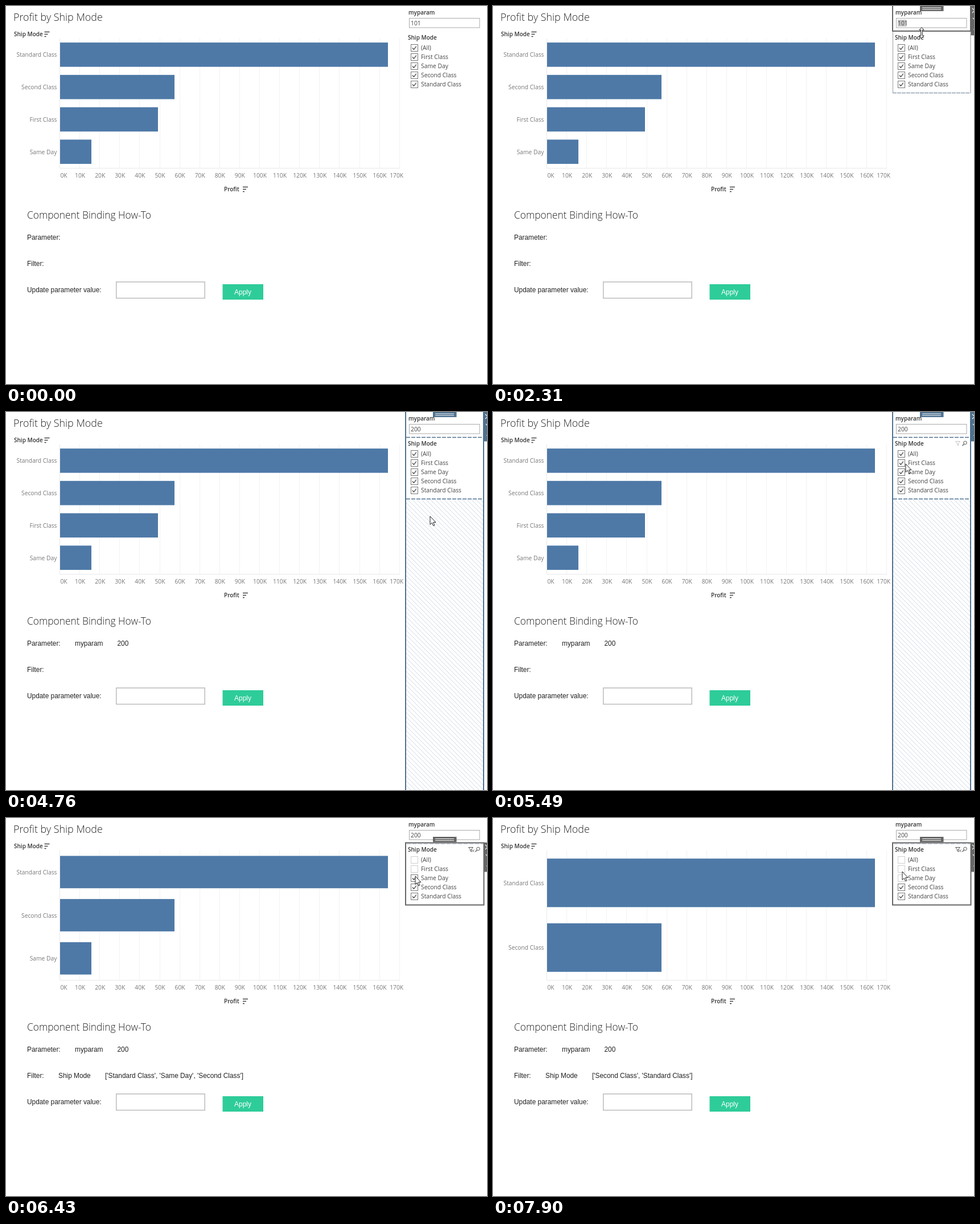
These frames come from a looping animation (845 px wide and 663 px high, 8 s). An HTML page:

```html
<!DOCTYPE html>
<html lang="en">
<head>
<meta charset="utf-8">
<title>Profit by Ship Mode</title>
<style>
  html, body { margin: 0; width: 100%; height: 100%; overflow: hidden; background: #fff; }
  svg { display: block; width: 845px; height: 663px; }
  text { font: 10.3px "Open Sans", "Noto Sans", sans-serif; fill: #444; white-space: pre; }
  .title { font-size: 17.9px; font-weight: 300; fill: #222; }
  .sub { font-size: 17.35px; }
  .bold { font-size: 10px; font-weight: 600; fill: #333; }
  .axis { fill: #787878; }
  .form { font: 11.86px "Liberation Sans", Arial, sans-serif; fill: #222; }
  .button { font-size: 12px; fill: #fff; }
</style>
</head>
<body>
<svg viewBox="0 0 845 663" xmlns="http://www.w3.org/2000/svg">
  <defs>
    <clipPath id="pane"><rect x="95" y="57" width="600" height="227"/></clipPath>
    <pattern id="hatch" width="8" height="8" patternUnits="userSpaceOnUse">
      <path d="M-2-2L10 10M-2 6L2 10M6-2L10 2" stroke="#c3cede" stroke-width=".8"/>
    </pattern>
  </defs>
  <g id="grid"></g>
  <g id="fixed"></g>
  <g id="live"></g>
</svg>
<script>
const LOOP = 8000;
const PANE = { x: 95, top: 57, height: 227, step: 35.1 };
const GRAY = '#666', BLUE = '#4f7190';
const MODES = [
  { name: 'Standard Class', width: 576 },
  { name: 'Second Class', width: 201 },
  { name: 'First Class', width: 172 },
  { name: 'Same Day', width: 55 }
];
const FILTERS = ['(All)', 'First Class', 'Same Day', 'Second Class', 'Standard Class'];
// Each removal: bar index, click time, start of movement, length, sideways drift, shrink
const REMOVALS = [
  { mode: 2, click: 5780, start: 5915, length: 325, drift: 0, shrink: 0 },
  { mode: 3, click: 6950, start: 7125, length: 335, drift: 257, shrink: 23 }
];
const TIMES = { focus: 1720, highlight: 1870, enter: 3550, container: 4700, hover: 5150 };
// time, x, y
const TRACK = [
  [540, 640, 663], [810, 603, 590], [1050, 603, 590], [1760, 735, 29],
  [1860, 735, 29], [1940, 753, 47], [4110, 753, 47], [4130, 753, 53],
  [4600, 745, 195], [4920, 745, 171], [5490, 725, 91], [5630, 719, 86],
  [6290, 719, 86], [6430, 719, 102], [7820, 719, 102], [7900, 719, 94]
];

const $ = id => document.getElementById(id);
const clamp = v => Math.max(0, Math.min(1, v));
const mix = (a, b, p) => a + (b - a) * p;
const ease = p => (1 - Math.cos(Math.PI * p)) / 2;

const text = (x, y, value, cls = '', anchor = 'start') =>
  `<text x="${x}" y="${y}" class="${cls}" text-anchor="${anchor}">${value}</text>`;
const rect = (x, y, w, h, fill, extra = '') =>
  `<rect x="${x}" y="${y}" width="${w}" height="${h}" fill="${fill}" ${extra}/>`;
const line = (d, stroke, width = 1, extra = '') =>
  `<path d="${d}" fill="none" stroke="${stroke}" stroke-width="${width}" ${extra}/>`;
const sortIcon = (x, y) => line(`M${x} ${y}h9m-9 4h6m-6 4h3`, '#444', 1.3);

function drawGrid() {
  let out = '';
  for (let i = 1; i <= 17; i++) {
    out += line(`M${Math.floor(PANE.x - 0.5 + i * PANE.step) + 0.5} 57V284`, '#f2f2f2');
  }
  return out;
}

function drawFixed() {
  let out = line('M94.5 57V284.5H692', '#e8e8e8');
  for (let i = 0; i <= 17; i++) {
    const nudge = i === 0 ? 6.5 : i === 17 ? -5.5 : 0;
    out += text(PANE.x + i * PANE.step + nudge, 301, `${i * 10}K`, 'axis', 'middle');
  }
  return out
    + text(13, 26, 'Profit by Ship Mode', 'title')
    + text(14, 53, 'Ship Mode', 'bold') + sortIcon(67.5, 45.5)
    + text(383, 325, 'Profit', 'bold') + sortIcon(416, 317.5)
    + text(37, 372.5, 'Component Binding How-To', 'title sub')
    + text(37, 410.3, 'Parameter:', 'form')
    + text(37, 456, 'Filter:', 'form')
    + text(37, 501.5, 'Update parameter value:', 'form')
    + rect(193.75, 484, 155.5, 28.5, '#fff', 'stroke="#bbb" stroke-width="1.5"')
    + rect(380.5, 488, 71.5, 27, '#2ecc99')
    + text(416, 506, 'Apply', 'form button', 'middle')
    + text(707, 14.5, 'myparam', 'bold')
    + rect(708.5, 21.5, 123.5, 16.5, '#fff', 'stroke="#aaa"')
    + text(706, 58.5, 'Ship Mode', 'bold')
    + FILTERS.map((name, i) => text(729, 77 + i * 16, name)).join('');
}

function drawBars(t) {
  let rows = [0, 1, 2, 3], step = null;
  for (const r of REMOVALS) {
    if (t < r.start) break;
    step = { ...r, before: rows };
    rows = rows.filter(i => i !== r.mode);
  }
  const before = step ? step.before : rows;
  const p = step ? ease(clamp((t - step.start) / step.length)) : 1;
  const oldRow = PANE.height / before.length, newRow = PANE.height / rows.length;
  let out = '';
  before.forEach((mode, i) => {
    const leaving = !rows.includes(mode);
    if (leaving && p === 1) return;
    const index = leaving ? i : rows.indexOf(mode);
    const center = PANE.top + mix((i + 0.5) * oldRow, (index + 0.5) * newRow, p);
    const height = 0.75 * (leaving ? oldRow : mix(oldRow, newRow, p ** 0.65));
    const x = PANE.x + (leaving ? step.drift * p : 0);
    const width = MODES[mode].width - (leaving ? step.shrink * p : 0);
    const bar = rect(x, center - height / 2, width, height, '#4e79a7',
      leaving ? `opacity="${1 - p ** 0.7}"` : '');
    out = leaving ? bar + out : out + bar;
  });
  const labels = rows.map((mode, i) =>
    text(89.5, PANE.top + (i + 0.5) * newRow + 4, MODES[mode].name, 'axis', 'end')).join('');
  return `<g clip-path="url(#pane)">${out}</g>${labels}`;
}

function drawInput(t) {
  const typed = t < 2780 ? '101' : t < 2940 ? '2' : t < 3090 ? '20' : '200';
  const marked = t >= TIMES.highlight && t < 2780;
  return (marked ? rect(711, 24, 15.5, 12, '#c8c8c8') : '') + text(711, 33.5, typed);
}

function drawChecks(t) {
  const off = [];
  if (t >= REMOVALS[0].click) off.push(0, 1);
  if (t >= REMOVALS[1].click) off.push(2);
  return FILTERS.map((_, i) => {
    const y = 67.5 + i * 16, on = !off.includes(i);
    return rect(711.5, y, 12, 12, '#fff', `stroke="${on ? '#777' : '#d0d0d0'}"`)
      + (on ? line(`M714 ${y + 6}l2.5 2.8 4.3-5.6`, '#444', 1.3) : '');
  }).join('');
}

function drawBinding(t) {
  let out = '';
  if (t >= TIMES.enter) out += text(121, 410.3, 'myparam', 'form') + text(195.5, 410.3, '200', 'form');
  if (t >= REMOVALS[0].start) {
    const list = t < REMOVALS[1].start
      ? "['Standard Class', 'Same Day', 'Second Class']"
      : "['Second Class', 'Standard Class']";
    out += text(92, 456, 'Ship Mode', 'form') + text(174, 456, list, 'form');
  }
  return out;
}

// Drag grip on top and the cut-off toolbar at the right edge
const handles = (top, color, gripTop) =>
  rect(750, gripTop, 41.5, 9.5, color)
  + line(`M754 ${gripTop + 3.5}h33m-33 3h33`, '#fff')
  + rect(839.5, top, 6, 51.5, color)
  + line(`M842 ${top + 4}l4 4-4 4M843 ${top + 21}l3 3M844 ${top + 41}h2`, '#fff', 1.2);

function drawChrome(t) {
  if (t >= REMOVALS[0].click) {
    return line('M704 45.5H838', '#b9c2d6', 1, 'stroke-dasharray="7 3"')
      + rect(702, 43.5, 137.5, 109, 'none', `stroke="${GRAY}" stroke-width="2"`)
      + handles(43, GRAY, 33);
  }
  if (t >= TIMES.container) {
    return rect(703, 153, 136, 510, 'url(#hatch)')
      + line('M702 0V663M839 0V663', BLUE, 2)
      + line('M703 44.5H838M703 152.5H838', BLUE, 1.6, 'stroke-dasharray="7 2"')
      + handles(0, BLUE, -0.5);
  }
  if (t >= TIMES.focus) {
    return line('M702.5 45V152M839 45V152', '#aaa', 1.2)
      + line('M702 152.5H839', '#8fa0b4', 1.3, 'stroke-dasharray="7 1"')
      + line('M702 0V44H839V0', GRAY, 2)
      + handles(0, GRAY, -0.5);
  }
  if (t >= 640 && t < 1450) {
    return line('M4.5 0V663M703.5 0V663M4 .5H704M4 662.5H704', '#bbb');
  }
  return '';
}

function drawFilterIcons(t) {
  if (t < TIMES.hover) return '';
  const active = t >= REMOVALS[0].click;
  const color = active ? '#555' : '#c4c4c4';
  return line('M812.5 51.5h8l-3 3.5v4l-2-1.5V55z', color)
    + (active ? line('M818.5 55.5l4 4m0-4l-4 4', color) : '')
    + '<circle cx="829.5" cy="54" r="2.8" fill="none" stroke="#555"/>'
    + line('M827.5 56.2l-3 3', '#555', 1.3);
}

function drawCursor(t) {
  if (t < TRACK[0][0]) return '';
  const next = TRACK.findIndex(k => k[0] > t);
  let [, x, y] = TRACK[TRACK.length - 1];
  if (next > 0) {
    const [t0, x0, y0] = TRACK[next - 1], [t1, x1, y1] = TRACK[next];
    const p = ease((t - t0) / (t1 - t0));
    x = mix(x0, x1, p);
    y = mix(y0, y1, p);
  }
  let shape = 'M0 0V14.5L3.4 11.4 5.8 16.8 8 15.8 5.7 10.6H10Z';
  if (t < 1720 || t >= 4200) {
    // plain arrow
  } else if (t < 1900) {
    return `<g transform="translate(${x} ${y})">${line('M-3-7.5h2.5l.5 1 .5-1H3M0-7V7M-3 7.5h2.5l.5-1 .5 1H3', '#222')}</g>`;
  } else {
    shape = 'M0-9.5L4.2-5H1.3V5H4.2L0 9.5-4.2 5H-1.3V-5H-4.2Z';
  }
  return `<path d="${shape}" transform="translate(${x} ${y})" fill="#fff" stroke="#222" stroke-width="1"/>`;
}

function render(t) {
  const [, last] = REMOVALS;
  const hidden = t >= last.start && t < last.start + last.length;
  $('grid').setAttribute('visibility', hidden ? 'hidden' : 'visible');
  $('live').innerHTML = [drawBars, drawBinding, drawInput, drawChecks,
    drawChrome, drawFilterIcons, drawCursor].map(draw => draw(t)).join('');
}

$('grid').innerHTML = drawGrid();
$('fixed').innerHTML = drawFixed();
const origin = performance.now();
function tick() {
  render((performance.now() - origin) % LOOP);
  requestAnimationFrame(tick);
}
tick();
</script>
</body>
</html>
```
